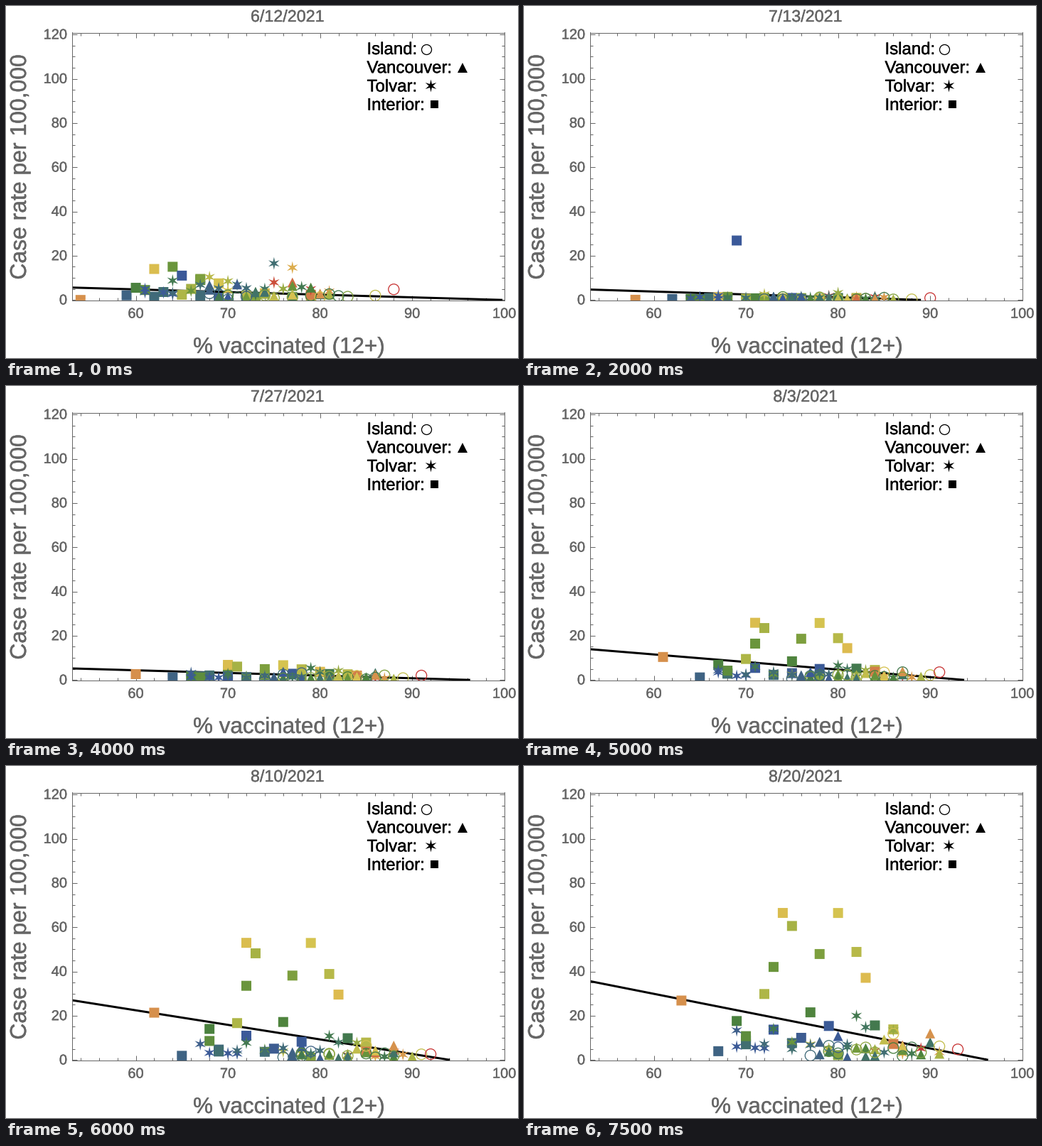
These frames come from a looping animation (720x496 px, 8 s). A matplotlib script:

```python
import numpy as np
import matplotlib.pyplot as plt
from matplotlib.animation import FuncAnimation
from matplotlib.colors import LinearSegmentedColormap
from matplotlib.lines import Line2D
from matplotlib.path import Path
from matplotlib.patheffects import withStroke
from matplotlib.ticker import MultipleLocator

W, H, DPI = 720, 496, 100
PX = 72 / DPI
GREY = "#666666"
plt.rcParams["font.family"] = "Liberation Sans"

rainbow = LinearSegmentedColormap.from_list("rainbow", [
    "#3b5999", "#3f6285", "#41736a", "#447d3e", "#6f983c", "#a9b446",
    "#d5c350", "#deb94f", "#d4884c", "#c83535"])

# Days since June 12: first reports, then twice a week
DAYS = np.array([0, 16, 23, 27] + [31 + 7 * k // 2 for k in range(12)])
TIME = DAYS / DAYS[-1]
WAVE = 1 / (1 + np.exp((54 - DAYS) / 4))
FADE = np.exp(-DAYS / 12)

# Trend line: height at the left edge, and where it meets zero
KEYS = [0, 23, 31, 45, 52, 59, 69]
left_rate = np.interp(DAYS, KEYS, [5.6, 2.1, 4.7, 5.2, 13.9, 27, 35.6])
zero_at = np.interp(DAYS, KEYS, [99.8, 91.8, 89, 96.3, 93.7, 94.1, 96.3])

# Outbreak areas: colour, first and last vaccination, first and peak case rate
OUTBREAKS = np.array([
    (.87, 54, 63, 0, 27.5), (.35, 60.4, 69, 5.5, 18), (.40, 61.1, 69.6, 4.5, 11),
    (.43, 64, 73, 15, 43), (.00, 65.2, 73.2, 11, 14), (.36, 67, 77, 9, 22),
    (.73, 62, 74, 14, 68), (.55, 65.5, 74.6, 5, 62), (.47, 67.3, 78.2, 9.5, 49),
    (.67, 69.25, 80.25, 7.5, 68), (.59, 71.7, 82.1, 2, 50), (.76, 73.5, 83.4, 3, 38)])

rng = np.random.default_rng(12)


def advance(first, last):
    return np.floor(first[:, None] + (last - first)[:, None] * TIME + .5)


def outbreaks():
    c, x0, x1, start, peak = OUTBREAKS.T
    rates = start[:, None] * FADE + peak[:, None] * WAVE
    rates[c == 0] += 26 * np.exp(-((DAYS - 31) / 6) ** 2)  # one early flare-up
    return c, advance(x0, x1), rates


def calm(n, first, last, start, end):
    """Areas spread over a range of vaccination, with low scattered rates."""
    jitter = rng.uniform(-1, 1, n)
    x = advance(np.linspace(*first, n) + jitter, np.linspace(*last, n) + jitter)
    early = rng.gamma(2.5, start / 2.5, (n, 1)) * FADE
    late = rng.gamma(2.5, end / 2.5, (n, 1)) * TIME ** 4
    rates = early + late + rng.exponential(.5, x.shape) * (rng.random(x.shape) < .6)
    colors = np.clip(rng.random(n) * np.linspace(.3, 1.3, n), 0, 1)
    return colors, x, rates


angle = np.pi / 2 + np.arange(13) * np.pi / 6
radius = np.where(np.arange(13) % 2, .32, 1)
STAR = Path(np.column_stack([radius * np.cos(angle), radius * np.sin(angle)]), closed=True)

fig = plt.figure(figsize=(W / DPI, H / DPI), dpi=DPI, facecolor="white")
ax = fig.add_axes([93 / W, 1 - 414.5 / H, 608 / W, 377 / H])
ax.set_xlim(53.09, 100.02)
ax.set_ylim(-.1, 120.9)
ax.xaxis.set_major_locator(MultipleLocator(10))
ax.xaxis.set_minor_locator(MultipleLocator(2))
ax.yaxis.set_major_locator(MultipleLocator(20))
ax.yaxis.set_minor_locator(MultipleLocator(5))
for kind, size in (("major", 7), ("minor", 4)):
    ax.tick_params(which=kind, direction="in", top=True, right=True, length=size * PX,
                   width=PX, color=GREY, labelleft=False, labelbottom=False)
for spine in ax.spines.values():
    spine.set(color=GREY, linewidth=PX)


def text(x, y, s, size, color=GREY, **kw):
    return fig.text(x / W, 1 - y / H, s, fontsize=size * PX, color=color,
                    path_effects=[withStroke(linewidth=.4 * PX, foreground=color)], **kw)


for v in range(60, 101, 10):
    text(182.5 + 12.955 * (v - 60), 439.5, str(v), 20, ha="center")
for v in range(0, 121, 20):
    text(86, 420.5 - 3.117 * v, str(v), 20, ha="right")
text(398, 489, "% vaccinated (12+)", 31.4, ha="center")
text(28, 227, "Case rate per 100,000", 31.9, ha="center", va="baseline",
     rotation=90, rotation_mode="anchor")
title = text(395.5, 22, "", 23.3, ha="center")

LEGEND = [("Island:", 591, 61, "o", 14), ("Vancouver:", 642, 87, "^", 13.5),
          ("Tolvar:", 597, 112, STAR, 18), ("Interior:", 601.5, 138, "s", 11)]
for i, (name, x, y, mark, size) in enumerate(LEGEND):
    text(507.5, 68 + 26.2 * i, name, 24, "black")
    hollow = mark == "o"
    fig.add_artist(Line2D([x / W], [1 - y / H], marker=mark, markersize=size * PX, color="black",
                          markerfacecolor="none" if hollow else "black",
                          markeredgewidth=1.3 * PX if hollow else 0))

trend, = ax.plot([], [], color="black", lw=3 * PX, zorder=2, solid_capstyle="butt")

GROUPS = [("s", 14, calm(11, (59, 80), (67, 87), 1.5, 12)),
          ("s", 14, outbreaks()),
          (STAR, 18, calm(23, (61, 80), (69, 90), 6.5, 7)),
          ("^", 14, calm(18, (68, 81), (78, 91), 3.5, 6)),
          ("o", 15, calm(15, (68, 87), (77, 92), 1.3, 4.5))]
layers = []
for z, (mark, size, (shade, xs, ys)) in enumerate(GROUPS):
    colors = rainbow(shade)
    hollow = mark == "o"
    dots = ax.scatter(xs[:, 0], ys[:, 0], s=(size * PX) ** 2, marker=mark,
                      facecolors="none" if hollow else colors, edgecolors=colors,
                      linewidths=1.3 * PX if hollow else 0, zorder=2.1 + z / 10, snap=False)
    layers.append((dots, xs, ys))


def date_label(day):
    month, date = 6, 12 + day
    for length in (30, 31):
        if date > length:
            month, date = month + 1, date - length
    return f"{month}/{date}/2021"


def draw(i):
    title.set_text(date_label(DAYS[i]))
    trend.set_data([53.09, zero_at[i]], [left_rate[i], 0])
    for dots, xs, ys in layers:
        dots.set_offsets(np.column_stack([xs[:, i], ys[:, i]]))
    return [title, trend] + [layer[0] for layer in layers]


anim = FuncAnimation(fig, draw, frames=len(DAYS), interval=500, repeat=True,
                     repeat_delay=0, blit=False)
plt.show()
```
